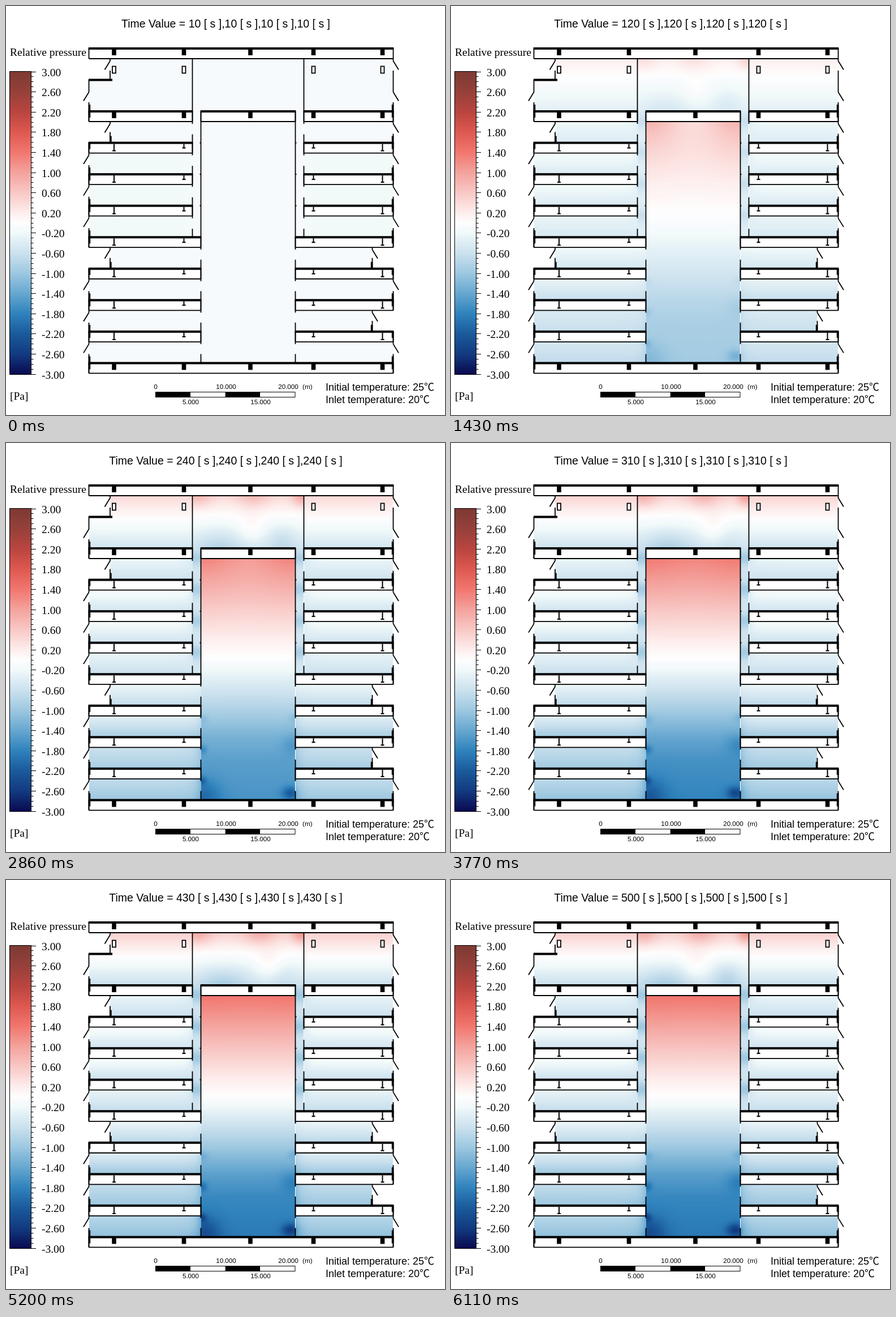
Animation of 776x722 px, one loop 6.24 s. Source, as an HTML page with a canvas:

```html
<!DOCTYPE html>
<html lang="en">
<head>
<meta charset="utf-8">
<title>Relative pressure</title>
<style>
html, body { margin: 0; width: 100%; height: 100%; overflow: hidden; background: #fff; }
canvas { display: block; }
</style>
</head>
<body>
<canvas id="stage" width="776" height="722"></canvas>
<script>
const ctx = document.getElementById('stage').getContext('2d');
const buf = document.createElement('canvas');
const bufCtx = buf.getContext('2d');

const LOOP = 6240, STEP = 130, LAST = 47, CELL = 3;
const SANS = '"Liberation Sans", Arial, "Noto Sans CJK SC", "Noto Sans CJK", sans-serif';
const SERIF = '"Liberation Serif", "Times New Roman", serif';

// Pressure in Pa and its colour, high to low
const SCALE = [
  [3, '7d3a33'], [2.6, '96403a'], [2.2, 'b9453f'], [1.8, 'dd5850'],
  [1.4, 'f1776f'], [1, 'f4a29d'], [0.6, 'f8c8c5'], [0.2, 'fdeeed'],
  [0, 'fefefe'], [-0.1, 'f7fafd'], [-0.2, 'f1faf9'], [-0.3, 'e6f2f7'],
  [-0.6, 'cbe1ee'], [-1, '9cc7e0'], [-1.4, '66a7d0'], [-1.8, '2f82bc'],
  [-2.2, '1a5a9b'], [-2.6, '123a80'], [-3, '090a50']
];
// Final pressure down the atrium
const COLUMN = [
  [204, 1.42], [250, 1.05], [300, 0.62], [350, 0.22], [381, 0], [410, -0.33],
  [440, -0.66], [480, -1.08], [520, -1.5], [560, -1.75], [629, -1.9]
];
// Final pressure at the ceiling and floor of each storey
const STOREYS = [
  [-0.25, -0.6], [-0.05, -0.55], [-0.08, -0.58], [-0.25, -0.65],
  [-0.22, -0.75], [-0.35, -1], [-0.65, -1], [-0.75, -1.1]
];

const lerp = (a, b, t) => a + (b - a) * t;
const floorY = i => 186 + 55.55 * i;
const blob = (x, y, cx, cy, rx, ry) => Math.exp(-(((x - cx) / rx) ** 2) - ((y - cy) / ry) ** 2);
const leftSetback = i => i === 1 || i === 5;
const rightSetback = i => i === 5 || i === 7;
const leftEnd = i => i < 4 ? 329.5 : 344.5;
const rightEnd = i => i < 4 ? 526.5 : 511.5;

function curve(pts, x) {
  for (let i = 1; i < pts.length; i++) {
    const [xa, a] = pts[i - 1], [xb, b] = pts[i];
    if (x <= xb) return lerp(a, b, Math.max(0, (x - xa) / (xb - xa)));
  }
  return pts[pts.length - 1][1];
}

// Colour lookup from -3 to 3 Pa
const LUT = (() => {
  const stops = SCALE.map(([v, hex]) => [v, [0, 2, 4].map(k => parseInt(hex.slice(k, k + 2), 16))]).reverse();
  const chan = [0, 1, 2].map(k => stops.map(([v, c]) => [v, c[k]]));
  return Array.from({ length: 601 }, (_, i) => chan.map(pts => curve(pts, i / 100 - 3)));
})();

let grow = 0, drift = 0;

function setTime(s) {
  grow = 1 - Math.exp(-(((s - 10) / 152) ** 1.437));
  drift = Math.exp(-(((s - 370) / 80) ** 4));
}

const early = () => -0.11 * (1 - grow);

function atrium(x, y) {
  const sway = 0.9 * grow * (1 - grow) * Math.exp(-(y - 204) / 40) * Math.cos((x - 345) / 166 * 2 * Math.PI);
  const low = 0.5 * blob(x, y, 350, 624, 30, 30) + 0.75 * blob(x, y, 503, 618, 15, 11)
    + 0.5 * blob(x, y, 347, 596, 7, 7) + 0.4 * blob(x, y, 347, 541, 8, 8)
    + 0.25 * blob(x, y, 507, 532, 20, 18) + 0.2 * blob(x, y, 347, 487, 10, 8)
    + 0.2 * blob(x, y, 509, 485, 10, 8);
  return early() + grow * curve(COLUMN, y) + sway - grow * low;
}

function topHall(x, y) {
  const base = y < 130 ? lerp(0.5, 0, (y - 93) / 37) : lerp(0, -0.55, (y - 130) / 55);
  const high = 0.42 * blob(x, y, 340, 94, 24, 20)
    + 0.4 * blob(x, y, 420 + 20 * grow + 12 * drift, 94, 28, 20)
    + 0.65 * blob(x, y, 522, 94, 16, 18)
    + 0.25 * blob(x, y, 433 + 44 * drift, 152, 24, 28);
  const low = 0.35 * blob(x, y, 378 + 8 * drift, 184, 44, 34)
    + 0.32 * (1 - 0.8 * drift) * blob(x, y, 488, 172, 26, 30);
  return early() + grow * (base + high - low);
}

function topSide(x, y) {
  return early() + grow * lerp(0.52, -0.6, (y - 93) / 92);
}

function shaft(x, y) {
  let p = -0.55;
  for (let i = 0; i < 4; i++) p -= 0.42 * blob(x, y, x, floorY(i) + 17, 1, 13);
  return early() + grow ** 0.75 * p;
}

function storey(i, edge) {
  const [top, bottom] = STOREYS[i], y0 = floorY(i) + 18;
  const mint = i > 0 && i < 4 ? -0.08 * (1 - grow) : 0;
  const beside = i < 4 ? shaft : atrium;
  return (x, y) => {
    const p = early() + mint + grow ** 0.75 * lerp(top, bottom, (y - y0) / 37.5);
    return lerp(p, beside(edge, y), 0.4 * Math.exp(-Math.abs(x - edge) / 9));
  };
}

function paint(x0, y0, x1, y1, field) {
  const w = x1 - x0, h = y1 - y0;
  const cols = Math.ceil(w / CELL), rows = Math.ceil(h / CELL);
  buf.width = cols;
  buf.height = rows;
  const img = bufCtx.createImageData(cols, rows);
  for (let r = 0, k = 0; r < rows; r++) {
    for (let c = 0; c < cols; c++, k += 4) {
      const p = field(x0 + (c + 0.5) * w / cols, y0 + (r + 0.5) * h / rows);
      const rgb = LUT[Math.max(0, Math.min(600, Math.round((p + 3) * 100)))];
      img.data.set(rgb, k);
      img.data[k + 3] = 255;
    }
  }
  bufCtx.putImageData(img, 0, 0);
  ctx.drawImage(buf, x0, y0, w, h);
}

function drawFields() {
  paint(184, 93, 329, 186, topSide);
  paint(147, 131, 185, 186, topSide);
  paint(527, 93, 684, 186, topSide);
  paint(330, 93, 526, 186, topHall);
  paint(330, 186, 344, 408, shaft);
  paint(512, 186, 526, 408, shaft);
  paint(345, 204, 511, 630, atrium);
  for (let i = 0; i < 8; i++) {
    const y0 = Math.round(floorY(i) + 18), y1 = Math.round(floorY(i + 1));
    const a = Math.ceil(leftEnd(i)), b = Math.ceil(rightEnd(i));
    paint(leftSetback(i + 1) ? 184 : 147, y0, a, y1, storey(i, a));
    paint(b, y0, rightSetback(i + 1) ? 647 : 684, y1, storey(i, b));
  }
}

function line(x1, y1, x2, y2, w = 1.8) {
  ctx.lineWidth = w;
  ctx.beginPath();
  ctx.moveTo(x1, y1);
  ctx.lineTo(x2, y2);
  ctx.stroke();
}

const box = (x, y, w, h) => ctx.fillRect(x, y, w, h);
const vane = (x, y, dir) => line(x, y, x + 9.5 * dir, y + 15.5);

function slab(xa, xb, y) {
  ctx.fillStyle = '#fff';
  box(xa, y, xb - xa, 18);
  ctx.fillStyle = '#000';
  box(xa - 0.8, y - 2, xb - xa + 1.6, 4);
  line(xa, y + 18, xb, y + 18);
  line(xa, y, xa, y + 18);
  line(xb, y, xb, y + 18);
}

function hanger(x, y, len) {
  line(x, y + 2, x, y + len, 2);
  box(x - 3, y + len - 1, 6, 2);
}

// Outer end of a slab with its window in the storey below
function facade(i, x, inset, dir, setback) {
  const y = floorY(i), above = setback(i), below = setback(i + 1);
  line(x, above ? y : y - 16, x, y + 18);
  box(dir < 0 ? x - 0.8 : x - 2.7, above ? y : y - 12, 3.5, above ? 11 : 23);
  if (above) {
    line(inset, y - 19, inset, y);
    box(dir < 0 ? inset - 0.8 : inset - 2.7, y - 12, 3.5, 12);
  }
  if (i < 8) {
    const wx = below ? inset : x;
    line(wx, y + 18, wx, y + 22);
    vane(wx, y + 22, dir);
  }
}

function drawBuilding() {
  ctx.strokeStyle = ctx.fillStyle = '#000';
  const columns = [191, 314.5, 432, 543.5, 665.5];
  slab(146.5, 684.5, 75);
  slab(344.5, 511.5, 186);
  slab(146.5, 684.5, floorY(8));
  for (let i = 0; i < 8; i++) {
    slab(146.5, leftEnd(i), floorY(i));
    slab(rightEnd(i), 684.5, floorY(i));
  }
  for (let i = 0; i < 9; i++) {
    facade(i, 146.5, 184, -1, leftSetback);
    facade(i, 684.5, 647.5, 1, rightSetback);
  }
  for (const x of columns) {
    for (const y of [75, 186, floorY(8)]) box(x - 3.8, y, 7.6, 12);
    if (x === 432) continue;
    ctx.fillStyle = '#fff';
    box(x - 3, 106.5, 6, 12);
    ctx.fillStyle = '#000';
    ctx.lineWidth = 1.8;
    ctx.strokeRect(x - 3, 106.5, 6, 12);
    const len = x === 191 || x === 665.5 ? 14 : 9;
    for (let i = 1; i < 8; i++) hanger(x, floorY(i), len);
  }

  // Upper storey windows
  line(184, 93, 184, 97);
  vane(184, 97, -1);
  line(184, 114, 184, 130);
  box(146, 128.5, 42, 4);
  line(146.5, 130, 146.5, 152);
  vane(146.5, 152, -1);
  line(684.5, 93, 684.5, 97);
  vane(684.5, 97, 1);
  line(684.5, 114, 684.5, 152);
  vane(684.5, 152, 1);

  // Shaft and atrium walls
  for (const x of [329.5, 526.5]) {
    line(x, 93, x, 208);
    for (let i = 1; i < 5; i++) line(x, floorY(i) - 15, x, floorY(i) + (i < 4 ? 22 : 0));
  }
  for (const x of [344.5, 511.5]) {
    line(x, 186, x, 430);
    for (let i = 5; i < 9; i++) line(x, floorY(i) - 16, x, floorY(i) + (i < 8 ? 22 : 0));
    for (let i = 1; i < 4; i++) box(x + (x < 400 ? -2 : 0), floorY(i) - 1, 2, 2);
  }
}

function text(str, x, y, size, family, align = 'left') {
  ctx.font = size + 'px ' + family;
  ctx.textAlign = align;
  ctx.fillStyle = '#000';
  ctx.fillText(str, x, y);
}

function drawLegend() {
  text('Relative pressure', 7, 88, 19.5, SERIF);
  for (let y = 116; y < 650; y++) {
    const v = 3 - (y + 0.5 - 116) / 534 * 6;
    ctx.fillStyle = 'rgb(' + LUT[Math.round((v + 3) * 100)] + ')';
    box(7, y, 38, 1);
  }
  ctx.lineWidth = 1;
  ctx.strokeRect(6.5, 115.5, 38, 535);
  for (let i = 0; i <= 60; i++) {
    const y = Math.round(115.5 + i * 8.9) + 0.5;
    line(44, y, i % 4 ? 48.5 : 53, y, 1);
  }
  for (let i = 0; i <= 15; i++) text((3 - i * 0.4).toFixed(2), 63, 123.5 + i * 35.6, 19.5, SERIF);
  text('[Pa]', 7, 695, 19.5, SERIF);
}

function drawRuler() {
  for (let i = 0; i < 4; i++) {
    ctx.fillStyle = i % 2 ? '#fff' : '#000';
    box(264.5 + i * 61.6, 682, 61.6, 9);
  }
  ctx.lineWidth = 1;
  ctx.strokeRect(264.5, 681.5, 246.5, 9);
  const size = 11.7;
  text('0', 264.5, 676, size, SANS, 'center');
  text('10.000', 389, 676, size, SANS, 'center');
  text('20.000', 499, 676, size, SANS, 'center');
  text('(m)', 524, 676, size, SANS);
  text('5.000', 326.5, 703, size, SANS, 'center');
  text('15.000', 450, 703, size, SANS, 'center');
  text('Initial temperature: 25℃', 565, 679, 18, SANS);
  text('Inlet temperature: 20℃', 565, 701, 18, SANS);
}

function draw(step) {
  const s = 10 + 10 * Math.round(step * 49 / LAST);
  setTime(s);
  ctx.fillStyle = '#fff';
  box(0, 0, 776, 722);
  drawFields();
  drawBuilding();
  drawLegend();
  drawRuler();
  text('Time Value = ' + Array(4).fill(s + ' [ s ]').join(','), 388.5, 37.5, 19.5, SANS, 'center');
}

const start = performance.now();
let shown = -1;

function tick() {
  const step = Math.floor((performance.now() - start) % LOOP / STEP);
  if (step !== shown) draw(shown = step);
  requestAnimationFrame(tick);
}
tick();
</script>
</body>
</html>
```
